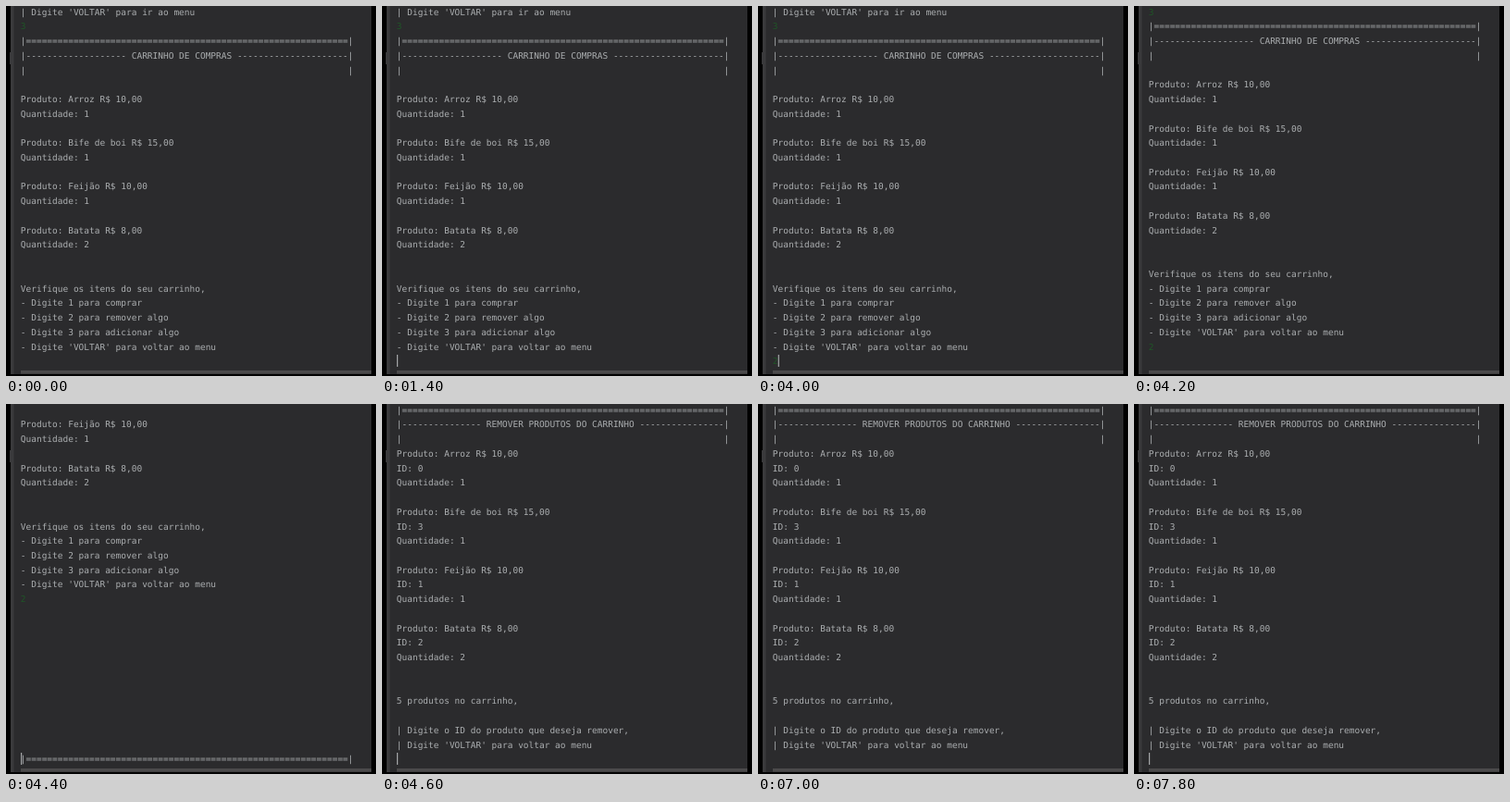
Animation, 400 px wide and 400 px high, one loop 8000 ms. Source, as an HTML page:

```html
<!DOCTYPE html>
<html lang="pt-BR">
<head>
<meta charset="utf-8">
<title>Carrinho de compras</title>
<style>
  html, body { margin: 0; width: 100%; height: 100%; overflow: hidden; background: #000; }
  svg { display: block; width: 100vw; height: 100vh; }
  text {
    font: 9.49px "DejaVu Sans Mono", "Noto Sans Mono", monospace;
    fill: #abaeb0;
    white-space: pre;
    text-rendering: geometricPrecision;
  }
  .typed { fill: #1f5527; }
</style>
</head>
<body>
<svg viewBox="0 0 400 400" xmlns="http://www.w3.org/2000/svg">
  <rect width="400" height="400" fill="#000"/>
  <rect x="5" width="4" height="398" fill="#3a3a3c"/>
  <rect x="4" y="50" width="2" height="13" fill="#3a3a3c"/>
  <rect x="8.5" width="386.5" height="398" fill="#2b2b2d"/>
  <rect x="16" y="394" width="379" height="3.6" fill="#4b4a4b"/>
  <g id="log"></g>
  <rect id="caret" y="377" width="1.2" height="13" fill="#a4a6a8"/>
</svg>
<script>
const NS = "http://www.w3.org/2000/svg";
const LOOP = 8000, LEFT = 15.8, BASE = 9.6, LINE = 15.74, CHAR = 5.713, ROWS = 25;

const rule = "|" + "=".repeat(61) + "|";
const gap = "|" + " ".repeat(61) + "|";
const heading = (title, left, right) =>
  "|" + "-".repeat(left) + ` ${title} ` + "-".repeat(right) + "|";

// name, price, id, quantity
const cart = [
  ["Arroz", 10, 0, 1],
  ["Bife de boi", 15, 3, 1],
  ["Feijão", 10, 1, 1],
  ["Batata", 8, 2, 2]
];
const listCart = withId => cart.flatMap(([name, price, id, count]) => [
  `Produto: ${name} R$ ${price},00`,
  ...(withId ? [`ID: ${id}`] : []),
  `Quantidade: ${count}`,
  ""
]);

const rows = [
  "| Digite 'VOLTAR' para ir ao menu",
  { typed: "3" },
  rule, heading("CARRINHO DE COMPRAS", 19, 21), gap, "",
  ...listCart(false), "",
  "Verifique os itens do seu carrinho,",
  "- Digite 1 para comprar",
  "- Digite 2 para remover algo",
  "- Digite 3 para adicionar algo",
  "- Digite 'VOLTAR' para voltar ao menu",
  { typed: "2" },
  ...Array(10).fill(""),
  rule, heading("REMOVER PRODUTOS DO CARRINHO", 15, 16), gap,
  ...listCart(true), "",
  "5 produtos no carrinho,", "",
  "| Digite o ID do produto que deseja remover,",
  "| Digite 'VOLTAR' para voltar ao menu"
];

// [time, first visible row]
const scrolls = [[0, 0], [4200, 1], [4400, 11], [4600, 35]];
// times at which the caret turns on or off, starting off
const blinks = [200, 800, 1400, 2400, 3000, 3600, 3800, 4200, 4400, 5000,
                5600, 6000, 6600, 7000, 7600];
const TYPE_AT = 3800, ENTER_AT = 4200;

const log = document.getElementById("log");
const caret = document.getElementById("caret");
const answer = rows.findIndex(r => r.typed === "2");

const lines = rows.map((row, i) => {
  const el = document.createElementNS(NS, "text");
  el.setAttribute("x", LEFT);
  el.setAttribute("y", BASE + i * LINE);
  if (row.typed) el.setAttribute("class", "typed");
  el.textContent = row.typed || row;
  return log.appendChild(el);
});

function draw(t) {
  const top = scrolls.filter(([at]) => at <= t).pop()[1];
  log.setAttribute("transform", `translate(0 ${-top * LINE})`);
  lines.forEach((el, i) => {
    const shown = i >= top && i < top + ROWS && (i !== answer || t >= TYPE_AT);
    el.style.display = shown ? "" : "none";
  });
  const typing = t >= TYPE_AT && t < ENTER_AT;
  caret.setAttribute("x", 16 + (typing ? CHAR : 0));
  caret.style.display = blinks.filter(at => at <= t).length % 2 ? "" : "none";
}

const start = performance.now();
function tick() {
  draw((performance.now() - start) % LOOP);
  requestAnimationFrame(tick);
}
tick();
</script>
</body>
</html>
```
